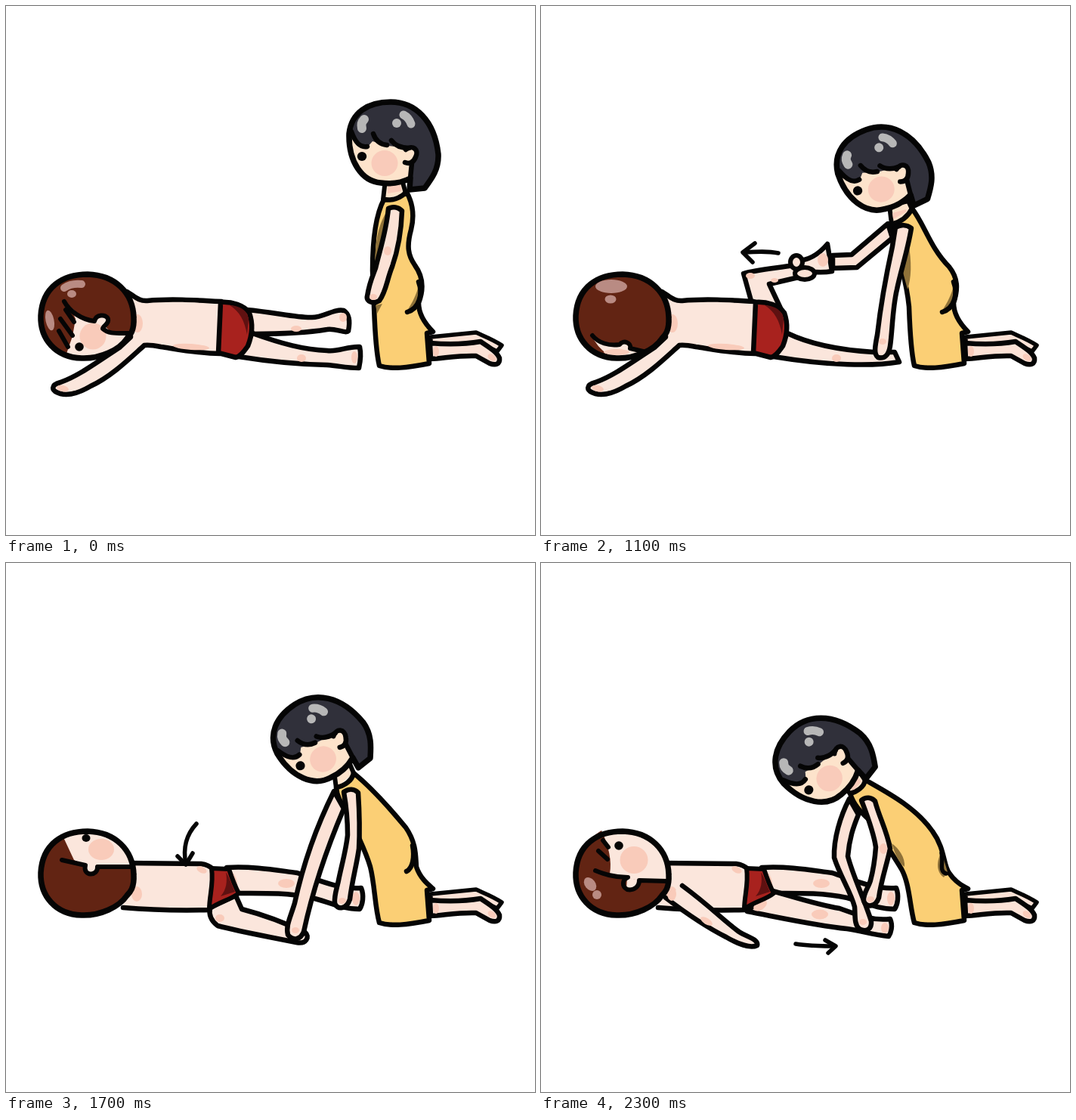
These frames come from a looping animation (700x700 px, 2800 ms). An HTML page:

```html
<!DOCTYPE html>
<html lang="en">
<head>
<meta charset="utf-8">
<title>Turning a patient</title>
<style>
html, body { margin: 0; width: 100%; height: 100%; overflow: hidden; background: #fff; }
svg { display: block; width: 100vw; height: 100vh; }
</style>
</head>
<body>
<svg id="stage" viewBox="0 0 700 700" stroke-linecap="round" stroke-linejoin="round"></svg>
<script>
const INK = '#050505', SKIN = '#fbe6dc', LIMB = '#fce2d6', FACE = '#fde3cb', PINK = '#f9cbba';
const BROWN = '#622413', BLACK = '#30303a', RED = '#a8221e', MAROON = '#5f1111';
const GOLD = '#fbcf75', OLIVE = '#8f7239', SHEEN = '#b98b83', GLOSS = '#b7b7b7';

const shape = (d, fill = 'none', w = 6.5, ink = INK) =>
  `<path d="${d}" fill="${fill}" stroke="${ink}" stroke-width="${w}"/>`;
const area = (d, fill) => `<path d="${d}" fill="${fill}"/>`;
const spot = (x, y, rx, ry = rx, fill = PINK, turn = 0) =>
  `<ellipse cx="${x}" cy="${y}" rx="${rx}" ry="${ry}" fill="${fill}" transform="rotate(${turn} ${x} ${y})"/>`;
const shine = (d, w, ink) => shape(d, 'none', w, ink);
const finger = (x, y, rx, ry) =>
  `<ellipse cx="${x}" cy="${y}" rx="${rx}" ry="${ry}" fill="${LIMB}" stroke="${INK}" stroke-width="6"/>`;
const arrow = (...lines) => lines.map(d => shape(d, 'none', 5.5)).join('');

// ---- carer ----
function carerHead(x, y, turn) {
  return `<g transform="translate(${x} ${y}) rotate(${turn}) translate(-512 -182)">` +
    area('M453 168C456 140 478 126 508 126L545 195L531 228C520 234 508 235 495 233C470 231 452 205 453 168Z', FACE) +
    spot(500, 207, 17.5, 17) +
    area('M453 168C456 140 478 126 508 126C540 126 566 150 571 195C572 215 562 228 553 240L533 242L537 210L532 187L504 184L484 178L477 186C467 186 461 178 453 168Z', BLACK) +
    shape('M453 168C456 140 478 126 508 126C540 126 566 150 571 195C572 215 562 228 553 240L533 242L534 227C520 234 508 235 495 233C470 231 452 205 453 168Z', 'none', 7.5) +
    shape('M528 189C537 182 546 189 541 199C538 207 532 208 527 206', FACE, 6.5) +
    shape('M536 207L534 227M456 165C461 179 467 187 477 185M485 168C488 177 494 182 503 183M509 177C514 184 521 187 532 187') +
    spot(470, 198, 6.2, 6, INK) + shine('M473 149C469 153 469 156 470 161', 12, GLOSS) +
    spot(516, 154, 6, 6, GLOSS) + shine('M525 143C529 145 533 149 535 155', 11, GLOSS) + '</g>';
}
const HEM = 'C546 410 556 422 565 431L557 433L560 473C530 479 510 481 494 476';
const BACK = '540 345C552 360 552 375 546 393';
const SEAT = area('M547 366C551 382 546 397 531 407C530 400 541 393 547 366Z', OLIVE) +
  shape('M546 365C552 381 547 400 531 405');
const SHINS =
  shape('M562 438L622 432C633 437 646 442 656 449L650 457L626 446L562 450Z', LIMB, 5.5) +
  shape('M561 446C585 448 605 448 628 444C640 452 650 458 653 466C654 474 648 476 640 473L622 463C600 462 580 466 562 467Z', LIMB) +
  spot(569, 457, 4, 7) + spot(643, 465, 6, 4, PINK, 35);

const body = {
  upright: shape('M499 256L502 230L524 230L529 248', FACE, 6) + area('M505 238L522 237L523 245L505 248Z', PINK) +
    shape('M500 256C512 258 522 254 530 246C540 264 540 280 536 296C530 318 532 330 541 343C552 358 553 375 546 393' +
      HEM + 'C489 455 488 425 487 398L485 350C485 310 490 275 500 256Z', GOLD) +
    area('M504 272C502 300 498 325 489 343C487 310 495 285 504 272Z', OLIVE) +
    area('M489 396L498 394L491 407Z', OLIVE) + SEAT,
  lean: shape('M479 286L478 264L503 258L508 271', FACE, 6) + area('M482 273L500 269L501 274L483 280Z', PINK) +
    shape('M478 287C490 286 502 280 509 269C522 290 522 325 ' + BACK + HEM +
      'C489 455 488 425 487 398L490 338C481 325 478 310 478 287Z', GOLD) +
    area('M490 401L502 397C503 404 497 409 491 411Z', OLIVE) + SEAT,
  reach: shape('M464 289L461 264L486 258L491 269', FACE, 6) + area('M465 274L483 269L484 272L466 282Z', PINK) +
    shape('M464 289C475 286 485 280 491 268C508 290 515 320 ' + BACK + HEM +
      'C489 455 488 425 487 398C485 378 482 365 478 350L466 318Z', GOLD) +
    area('M486 312C491 340 490 360 485 375L477 345Z', OLIVE) + SEAT,
  pull: shape('M437 298L434 276L455 266L460 278', FACE, 6) +
    shape('M437 297C448 295 458 288 460 278C482 296 505 321 529 350C543 370 542 388 543 402C548 417 558 425 565 431L557 433L560 473C530 479 510 481 494 476C488 455 488 425 482 402C475 378 465 362 455 335C446 320 438 312 437 297Z', GOLD) +
    shape('M538 374C541 390 538 404 530 408'),
  bend: shape('M410 306L402 298L419 272L429 288', FACE, 6) + area('M409 298L419 284L424 289L413 302Z', PINK) +
    shape('M409 305C418 303 428 296 429 287C455 302 495 322 518 355C535 378 532 400 540 410C550 425 560 428 565 431L557 433L560 473C530 479 510 481 494 476C488 455 488 425 477 405C465 385 455 372 445 350C430 335 415 325 409 305Z', GOLD) +
    area('M464 371C474 378 482 390 481 402C474 397 469 387 464 371Z', OLIVE) +
    area('M530 382C522 397 524 410 533 416L538 409Z', OLIVE) + shape('M530 384C533 395 526 408 536 411', 'none', 5.5)
};
const limb = (d, x, y) => shape(d, LIMB) + spot(x, y, 5, 4);
const near = {
  rest: limb('M506 268C512 265 519 266 524 271C523 300 518 325 511 345C504 362 503 378 494 390C486 395 476 391 478 384C481 365 485 358 489 347C494 325 503 300 506 268Z', 486, 385) + spot(505, 324, 5, 6),
  hold: limb('M493 290C500 286 507 287 513 292C513 320 508 345 504 358C498 385 480 415 463 447C460 460 452 471 443 467C434 462 440 451 450 445C465 420 478 395 483 375C492 345 495 320 493 290Z', 447, 459),
  press: limb('M469 293C476 289 484 289 490 294C485 325 476 350 471 375C465 400 465 430 462 450C460 463 454 467 446 465C440 461 442 450 445 435C449 400 458 350 465 318Z', 452, 444),
  low: limb('M469 293C476 289 484 289 490 294C485 325 476 350 470 375C463 405 462 440 459 460L460 477C454 479 446 479 439 476C438 455 443 430 446 410C452 375 460 345 465 318Z', 448, 459),
  pull: limb('M447 303C454 298 461 299 466 304C468 335 468 360 467 378C464 400 458 420 455 445C451 458 438 460 435 450C434 440 438 430 440 420C444 400 450 380 452 360C452 340 450 320 447 303Z', 445, 447),
  bend: limb('M424 314C430 309 437 310 442 315C447 335 458 355 462 378C458 398 450 420 447 443C443 455 430 457 427 447C426 438 433 430 436 420C440 405 442 390 443 376C440 355 430 330 424 314Z', 436, 445) + spot(453, 378, 5, 7)
};
const far = {
  hold: limb('M477 296C465 325 455 355 437 380C428 390 420 400 416 410L425 411C435 402 445 402 450 396C465 375 475 350 487 330Z', 427, 402) + finger(427, 428, 10, 8),
  raise: limb('M477 296C465 325 455 352 437 374C428 384 420 392 416 399L426 400C436 395 442 395 447 388C463 370 475 350 487 330Z', 427, 394) + finger(427, 416, 10, 7),
  lift: limb('M477 296C465 325 455 350 437 369C428 378 419 384 415 389L425 391C434 388 440 389 445 383C463 366 475 350 487 330Z', 427, 385) + finger(425, 405, 10, 6),
  grip: shape('M459 288L411 329L386 330L386 347L418 346L465 307Z', LIMB) +
    shape('M338 337C355 337 368 328 379 315L385 351C370 354 355 352 340 349Z', SKIN) + spot(373, 336, 7, 9) +
    finger(338, 339, 8, 9) + finger(349, 354, 13, 8),
  guide: limb('M459 288C440 312 420 335 398 350C385 359 371 364 360 373C354 381 366 386 377 381C395 375 412 368 426 356C442 342 455 328 465 312Z', 371, 375),
  over: limb('M460 290C440 315 430 335 411 352C397 366 380 382 364 392C357 400 365 407 374 405C384 402 388 399 395 391C410 380 423 372 435 358C448 345 457 330 465 318Z', 373, 397) + spot(424, 347, 10, 4, PINK, -48),
  pull: limb('M434 302C415 340 395 390 382 450C376 470 370 480 373 492C380 501 390 498 394 488C400 460 415 400 447 325Z', 383, 486),
  down: limb('M408 312C396 335 389 360 386 385C382 425 378 460 374 488C370 497 366 510 372 518C380 525 388 520 388 510C391 470 397 430 405 390C408 365 415 350 422 328Z', 379, 510),
  slide: limb('M408 312C396 335 387 365 386 392C391 430 396 460 396 484C395 496 397 507 405 508C415 507 415 495 414 482C415 450 409 415 406 388C408 365 413 350 420 333Z', 405, 497),
  end: limb('M408 312C396 335 387 365 388 390C396 415 410 435 415 455C416 465 414 478 421 484C430 489 438 485 437 474C428 445 413 415 406 388C408 365 413 350 420 333Z', 426, 475)
};

// ---- patient ----
const SKULL = 'M46 410C48 372 75 355 108 355C145 356 168 380 169 412C170 430 164 436 160 440C150 455 125 467 100 466C65 465 45 440 46 410Z';
const skull = (fill, inside) => area(SKULL, fill) + inside + shape(SKULL, 'none', 7.5);
const head = {
  side: skull(SKIN, spot(115, 437, 17.5) +
    area('M46 410C48 372 75 355 108 355C145 356 168 380 169 412L165 433L142 434L133 426L134 413L122 410L117 417L101 412L84 397L92 414L88 437L80 460C55 450 45 430 46 410Z', BROWN)) +
    shape('M77 391C84 404 100 415 117 417C119 408 132 407 135 414C137 421 128 423 128 427C136 434 144 433 165 433', 'none', 6) +
    shape('M79 402L90 418M72 414L88 436M70 430L82 451', 'none', 6) +
    spot(97, 451, 5.8, 5.8, INK) + shine('M77 373C84 368 91 367 100 368', 10, SHEEN) + spot(87, 381, 6, 5, SHEEN) + spot(58, 416, 5.5, 13.5, SHEEN, -12),
  down: skull(BROWN, area('M67 436L82 446L103 448C108 441 119 444 118 452L133 457C115 471 85 472 67 436Z', SKIN) + spot(100, 458, 17, 4)) +
    shape('M68 436C76 446 90 450 104 448C109 441 120 446 118 453L135 457', 'none', 6) +
    spot(93, 371, 21, 9, SHEEN) + spot(92, 388, 7.5, 5.5, SHEEN),
  back: skull(BROWN, ''),
  rising: skull(BROWN, area('M80 359C105 350 145 360 160 381L119 381C120 397 101 397 103 381L98 372L80 359Z', SKIN) + spot(132, 367, 14, 4, PINK, 22)) +
    shape('M78 379L103 381C98 397 121 397 119 382L166 381', 'none', 6),
  turned: skull(BROWN, area('M75 361C110 350 165 362 169 402L122 400C120 414 102 414 104 400L90 393Z', SKIN) + spot(126, 379, 17, 14)) +
    shape('M74 393L105 400C101 415 122 415 121 402L166 402', 'none', 6) + spot(106, 364, 5.5, 5, INK),
  up: skull(SKIN, spot(123, 393, 18.5, 18) +
    area('M80 354C55 370 46 385 46 410C44 440 65 467 100 467C135 467 166 450 169 418L130 420L110 416L91 411C94 395 90 375 80 354Z', BROWN)) +
    shape('M82 367L89 376M76 381L88 392', 'none', 6) +
    area('M114 416L130 420L127 430L113 430Z', SKIN) +
    shape('M72 407C82 411 95 416 115 416C107 419 107 428 114 432C123 434 130 428 130 420L167 421', 'none', 6) +
    spot(103, 374, 5.8, 5.8, INK) + spot(65, 425, 7, 10, SHEEN, -38) + spot(74, 439, 6, 6, SHEEN)
};
const PRONE = shape('M160 378C170 384 176 391 187 390C215 387 250 389 285 391L283 460C255 460 225 454 205 451C195 449 188 448 183 449C165 465 140 490 112 503C95 513 83 516 72 513C58 509 60 501 72 498C95 490 118 473 150 452L165 438Z', SKIN) +
  spot(174, 420, 7, 12) + spot(245, 451, 24, 4, PINK, 4) + spot(75, 506, 8, 4, PINK, 12);
const TRUNKS = shape('M284 392C299 391 315 396 322 406C327 420 326 435 320 450C313 460 309 464 304 465L281 459Z', RED) +
  area('M296 396C311 397 319 403 321 414L319 435C316 417 309 404 296 396Z', MAROON);
const SUPINE = shape('M160 397L258 398C266 399 271 402 275 406L270 459C230 460 190 459 155 456', SKIN) +
  spot(173, 438, 7, 10) + spot(259, 406, 7, 4, PINK, 25);
const BRIEFS = shape('M272 404L295 405C299 417 303 428 308 437C297 446 282 448 269 458C269 440 275 425 272 404Z', RED, 6) +
  area('M291 409C298 421 300 430 303 435L284 441C292 432 293 421 291 409Z', MAROON);
const leg = {
  near: shape('M326 433C365 447 395 455 425 456C440 458 452 450 468 451C470 460 469 470 467 479C450 479 440 476 425 475C380 474 345 470 308 464Z', SKIN) +
    spot(391, 466, 6, 5) + spot(461, 465, 4, 8),
  nearFlat: shape('M326 433C355 447 390 455 440 458L468 458L474 471C440 477 380 476 308 464Z', SKIN) + spot(391, 466, 6, 5),
  nearLow: shape('M326 433C365 444 400 453 440 456L464 459C469 466 468 474 464 478L440 473C395 474 345 472 308 464Z', SKIN) + spot(384, 460, 6.5, 6),
  flat: shape('M318 402C355 405 385 413 405 412C420 412 435 400 447 403C455 408 455 420 453 430C450 434 435 426 425 428C395 433 360 434 326 434Z', SKIN) +
    spot(384, 427, 7, 4) + spot(446, 412, 5, 6),
  rise: shape('M308 398C318 384 330 379 345 381C370 386 395 398 418 397L455 401C457 410 455 420 452 422C430 417 400 420 345 419L326 430Z', SKIN) + spot(355, 408, 7, 4),
  bent: shape('M304 396C308 375 312 362 322 358C335 354 345 360 352 363C380 370 400 378 415 387L459 399C461 407 458 414 451 414L400 402C380 400 365 402 346 399C338 405 334 412 328 425Z', SKIN) +
    spot(353, 390, 5, 6) + shape('M349 381L345 398') + spot(447, 404, 5, 5),
  folded: shape('M278 390L268 354C285 349 310 347 335 343L345 358L302 368L318 402Z', SKIN) + spot(277, 357, 6, 4) + spot(309, 363, 5, 3),
  swing: shape('M279 396C266 384 262 368 269 357C280 351 300 351 318 353C338 358 357 365 378 371C390 377 391 388 383 391C360 390 335 388 315 389C303 396 292 398 279 396Z', SKIN) + spot(275, 368, 5, 10),
  across: shape('M282 397C265 390 258 372 268 360C280 353 300 356 315 362C340 375 360 388 385 397C400 402 403 412 398 416C385 420 370 410 350 406C325 402 300 402 282 397Z', SKIN) +
    spot(272, 373, 5, 11, PINK, -15) + spot(390, 408, 7, 4, PINK, 30),
  away: shape('M292 403C330 401 360 407 385 410C415 420 440 432 470 430C474 440 472 452 468 458C445 458 425 448 405 443C370 436 340 437 306 437Z', SKIN) +
    spot(300, 419, 5, 12, PINK, -20) + spot(371, 424, 11, 6) + spot(463, 444, 5, 9),
  cross: shape('M270 456C268 466 272 474 280 480C310 488 345 494 384 502C398 505 402 494 396 489C365 474 335 464 312 458L304 440Z', SKIN) + spot(283, 470, 6, 5),
  drop: shape('M270 458C275 475 280 490 286 503C310 512 345 518 375 526L392 532C402 530 404 518 398 515L370 502C350 495 330 485 313 484C311 465 311 450 302 443C290 445 280 450 270 458Z', SKIN) +
    spot(291, 494, 7, 6) + spot(319, 490, 6, 4) + shape('M311 468L312 490') + spot(392, 523, 6, 5),
  extend: shape('M270 459C278 472 285 480 292 486C325 498 365 512 412 524C424 526 428 512 420 508C385 496 350 484 325 474C318 460 312 446 302 436C290 445 280 450 270 459Z', SKIN) + spot(330, 486, 8, 5),
  straight: shape('M303 433C335 442 365 452 395 457C420 466 440 474 462 471C466 480 463 490 460 494C440 492 425 487 405 484C365 480 320 470 273 461Z', SKIN) +
    spot(290, 453, 10, 6, PINK, -35) + spot(369, 465, 11, 6.5) + spot(455, 483, 5, 7)
};
const arm = {
  back: shape('M163 386C170 370 182 364 186 376C192 395 196 410 195 423', SKIN) + area('M166 400L195 402L193 424L168 416Z', SKIN) +
    shape('M164 382C172 385 176 392 178 400', 'none', 5.5) + spot(198, 411, 4, 9),
  chest: shape('M170 441C195 452 220 457 250 456C265 455 266 443 254 440C230 438 205 432 186 423', SKIN),
  side: shape('M165 443C190 462 215 480 245 495C262 505 278 510 286 506C288 498 275 496 262 488C240 472 225 455 187 427', SKIN) +
    spot(173, 438, 6, 9) + spot(219, 474, 9, 4, PINK, 32)
};

// ---- poses: start time and layers from back to front ----
const prone = (h, back, front = '') => PRONE + back + TRUNKS + front + head[h];
const supine = (h, back, front = '') => SUPINE + back + BRIEFS + front + head[h];
const carer = (b, n, f, ...h) => (far[f] || '') + SHINS + body[b] + near[n] + carerHead(...h);
const LEAN = [472, 215, -20], REACH = [453, 215, -20], PULL = [416, 232, -33], BEND = [372, 259, -46];

const poses = [
  [0, prone('side', leg.flat + leg.near) + carer('upright', 'rest', '', 513, 183, 0)],
  [500, prone('side', leg.flat + leg.near) + carer('lean', 'hold', 'hold', ...LEAN)],
  [700, prone('side', leg.rise + leg.near) + carer('lean', 'hold', 'raise', ...LEAN)],
  [900, prone('side', leg.bent + leg.near) + carer('lean', 'hold', 'lift', ...LEAN) +
    arrow('M392 358C382 351 370 346 358 342', 'M373 337L355 342L362 356')],
  [1100, prone('down', leg.folded + leg.nearFlat) + carer('reach', 'press', 'grip', ...REACH) +
    arrow('M314 327C300 324 285 325 268 326', 'M283 314L267 326L280 339')],
  [1300, prone('back', leg.nearFlat, leg.swing) + carer('reach', 'press', 'guide', ...REACH) +
    arrow('M305 313C290 313 277 319 266 333', 'M267 316L265 334L282 333')],
  [1500, prone('rising', leg.nearLow, leg.across) + carer('reach', 'low', 'over', ...REACH) +
    arrow('M293 313C280 318 270 330 266 343', 'M262 327L265 345L281 338')],
  [1700, supine('turned', leg.away + leg.cross) + carer('pull', 'pull', 'pull', ...PULL) +
    arrow('M252 345C238 360 234 378 238 398', 'M227 388L238 399L247 384')],
  [1900, supine('up', leg.away + leg.drop, arm.back) + carer('bend', 'bend', 'down', ...BEND) +
    arrow('M246 432C246 460 250 475 256 491', 'M245 483L257 492L262 475')],
  [2100, supine('up', leg.away + leg.extend, arm.chest) + carer('bend', 'bend', 'slide', ...BEND) +
    arrow('M278 520C296 523 312 523 329 523', 'M317 515L331 523L321 532')],
  [2300, supine('up', leg.away + leg.straight, arm.side) + carer('bend', 'bend', 'end', ...BEND) +
    arrow('M337 504C355 507 370 507 388 507', 'M376 499L390 507L380 516')]
];

const LOOP = 2800, stage = document.getElementById('stage'), start = performance.now();
let shown = null;
function draw(now) {
  const t = Math.max(0, now - start) % LOOP;
  const pose = poses.findLast(p => p[0] <= t);
  if (pose !== shown) {
    stage.innerHTML = pose[1];
    shown = pose;
  }
  requestAnimationFrame(draw);
}
draw(start);
</script>
</body>
</html>
```
